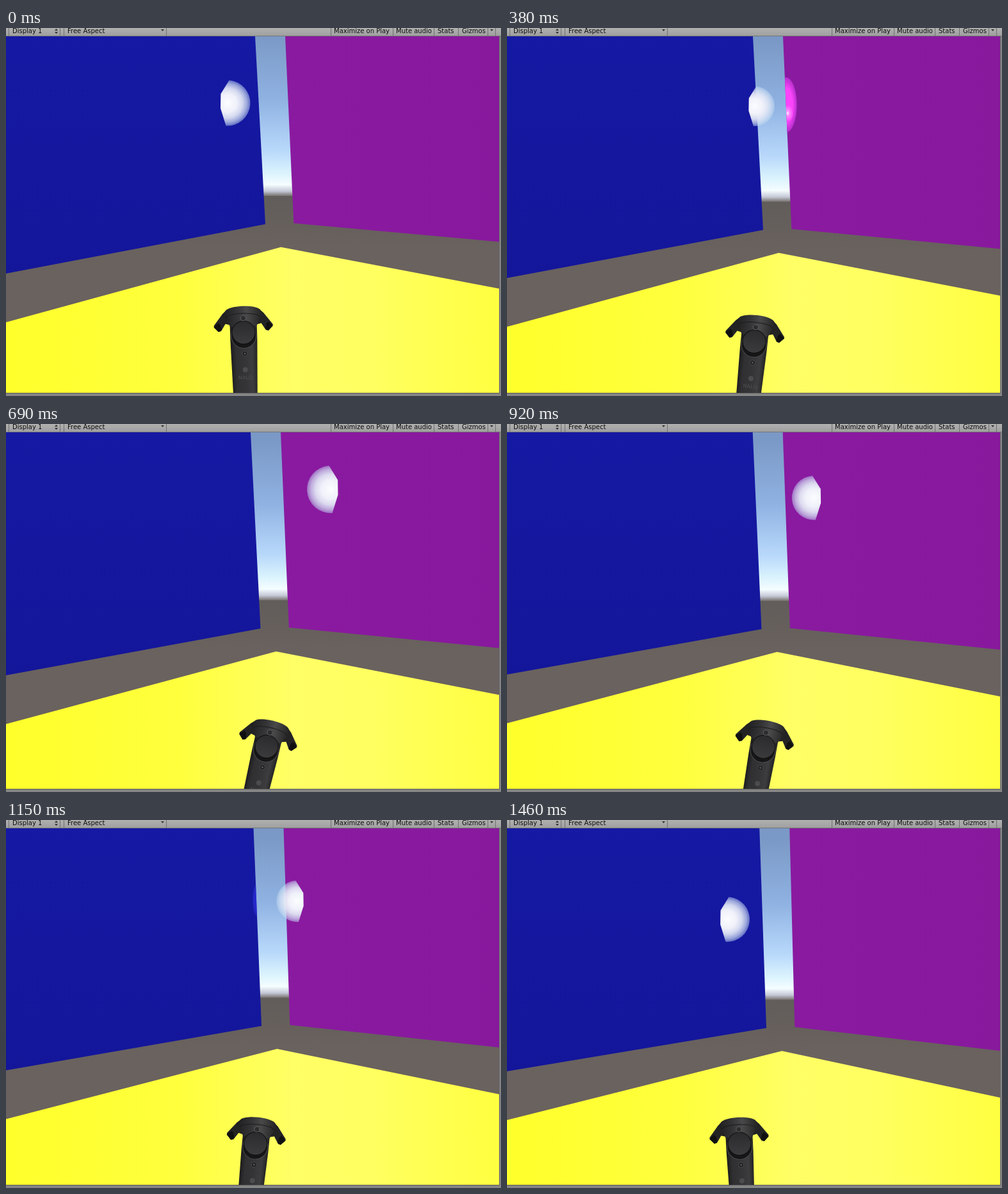
These frames come from a looping animation (773x574 px, 1540 ms). An HTML page with a canvas:

```html
<!DOCTYPE html>
<html lang="en">
<head>
<meta charset="utf-8">
<title>Corner room with controller</title>
<style>
  html, body { margin: 0; width: 100%; height: 100%; overflow: hidden; background: #858585; }
  canvas { display: block; }
</style>
</head>
<body>
<canvas id="stage" width="773" height="574"></canvas>
<script>
const ctx = document.getElementById('stage').getContext('2d');
const LOOP = 1540, STEP = 77, LAST = 19;

// step, corner x, corner y, wall top x, left y, right y, pad x, pad y, tilt
const poses = [
  [0, 405, 306, 389, 383, 333.5, 371, 475, -.03],
  [2, 403.5, 310.5, 387.5, 386, 339, 379, 479, .035],
  [5, 400, 315, 384, 390, 344.5, 386, 489, .105],
  [9, 397.5, 319, 382, 392, 349.5, 407, 503, .23],
  [14, 397.5, 320.5, 385, 390, 353.5, 396, 504, .14],
  [17, 402, 323, 390, 391.5, 357.5, 377, 506, .025],
  [19, 405, 324.5, 394.5, 392, 360, 363, 505, -.05]
];

// step, x, y, radius, wall (-1 blue, 1 purple), glow on the other wall
const balls = [
  [0, 346, 117, 35.5, -1, 0],
  [2, 379, 121, 33, -1, .4],
  [5, 387, 122, 31, -1, 1],
  [6, 444, 118, 33, 1, .9],
  [9, 507, 102, 37, 1, 0],
  [14, 461, 124, 33, 1, 0],
  [17, 442, 132, 31, 1, 1],
  [18, 378, 142, 33, -1, .3],
  [19, 344, 155, 35, -1, 0]
];

function sample(keys, step) {
  const next = Math.max(1, keys.findIndex(k => k[0] >= step));
  const a = keys[next - 1], b = keys[next];
  const u = (step - a[0]) / (b[0] - a[0]);
  return a.map((v, i) => v + (b[i] - v) * u).slice(1);
}

function fillStops(gradient, ...stops) {
  stops.forEach(([at, color]) => gradient.addColorStop(at, color));
  return gradient;
}

function linear(x0, y0, x1, y1, ...stops) {
  return fillStops(ctx.createLinearGradient(x0, y0, x1, y1), ...stops);
}

function radial(r, ...stops) {
  return fillStops(ctx.createRadialGradient(0, 0, 0, 0, 0, r), ...stops);
}

function trace(points) {
  ctx.beginPath();
  points.forEach(([x, y]) => ctx.lineTo(x, y));
  ctx.closePath();
}

function poly(fill, ...points) {
  trace(points);
  ctx.fillStyle = fill;
  ctx.fill();
}

function rect(fill, x, y, w, h) {
  ctx.fillStyle = fill;
  ctx.fillRect(x, y, w, h);
}

function disc(fill, x, y, r, stroke) {
  ctx.beginPath();
  ctx.arc(x, y, r, 0, 7);
  ctx.fillStyle = fill;
  ctx.fill();
  if (stroke) {
    ctx.strokeStyle = stroke;
    ctx.lineWidth = 1;
    ctx.stroke();
  }
}

function drawRoom([cx, cy, topX, leftY, rightY]) {
  const horizon = cy - 44;
  rect(linear(0, horizon, 0, horizon + 80, [0, '#615d5a'], [1, '#6a625e']), 0, 0, 773, 574);
  rect(linear(0, horizon - 250, 0, horizon,
    [0, '#7b99c6'], [.4, '#8fb2e2'], [.72, '#b9d9fb'], [.86, '#dcf4fd'],
    [.93, '#f5fdff'], [.97, '#c4c8d6'], [1, '#77726e']), 370, 0, 90, horizon);

  const blue = [[0, 0], [topX - .7, 0], [cx, cy], [0, leftY]];
  const purple = [[topX + 46.4, 0], [770, 0], [770, rightY], [cx + 44.3, cy - 1.5]];
  poly(linear(0, 0, 0, 390, [0, '#1519a3'], [1, '#14169a']), ...blue);
  poly(linear(430, 0, 770, 0, [0, '#8a1aa0'], [1, '#88199d']), ...purple);
  poly(linear(0, 0, 770, 0, [0, '#ffff2b'], [.35, '#ffff3d'], [.58, '#ffff66'],
    [.75, '#ffff60'], [1, '#ffff40']),
    [0, leftY + 76], [cx + 24.3, cy + 35.7], [770, rightY + 73], [770, 574], [0, 574]);
  return { blue, purple };
}

function drawGlow(walls, side, y, amount) {
  if (!amount) return;
  const onPurple = side < 0;
  const wall = onPurple ? walls.purple : walls.blue;
  const top = wall[onPurple ? 0 : 1], bottom = wall[onPurple ? 3 : 2];
  const edge = top[0] + (bottom[0] - top[0]) * y / bottom[1];
  const [rim, mid, core] = onPurple
    ? ['#b42ecb', '#fb45fa', '#ff8cff']
    : ['#2929c8', '#3636f5', '#8088f5'];
  ctx.save();
  trace(wall);
  ctx.clip();
  ctx.translate(edge, y);
  ctx.scale(17 * amount, 43 * Math.sqrt(amount));
  ctx.globalAlpha = .3 + .7 * amount;
  disc(radial(1, [0, mid], [.6, mid], [1, rim]), 0, 0, 1);
  if (amount > .8) {
    ctx.translate(.15, .3);
    ctx.scale(.5, .3);
    disc(radial(1, [0, '#fff'], [.3, core], [1, mid]), 0, 0, 1);
  }
  ctx.restore();
}

function drawBall([x, y, r, side]) {
  ctx.save();
  ctx.translate(x, y);
  ctx.scale(-side * r, r);
  ctx.beginPath();
  ctx.arc(0, 0, 1, -1.5, 1.64);
  ctx.lineTo(-.31, .23);
  ctx.lineTo(-.3, -.4);
  ctx.closePath();
  ctx.fillStyle = radial(1, [0, '#fbfdff'], [.4, '#f0f1fa'], [.65, 'rgba(226,231,245,.93)'],
    [.85, 'rgba(210,224,243,.72)'], [1, 'rgba(190,215,240,.45)']);
  ctx.fill();
  ctx.restore();
}

function drawController(x, y, tilt) {
  ctx.save();
  ctx.translate(x, y);
  ctx.rotate(tilt);

  // handle
  poly(linear(-21, 0, 21, 0, [0, '#1b1b1c'], [.2, '#303032'], [.55, '#353537'],
    [.8, '#3d3d3f'], [1, '#222']),
    [-21, -24], [21, -24], [21, 12], [18.5, 110], [-18.5, 110], [-21, 12]);

  // ring and wings
  for (const s of [-1, 1]) {
    poly('#232324', [s * 25, -36], [s * 32, -30], [s * 46, -12], [s * 46, -9], [s * 39, -2],
      [s * 35, -3], [s * 28, -14], [s * 20, -12], [s * 15, -28]);
    poly('#101011', [s * 36, -13], [s * 39, -16], [s * 46, -10], [s * 39, -2], [s * 34, -5]);
  }
  ctx.beginPath();
  ctx.moveTo(-33, -28);
  ctx.lineTo(-26, -36);
  ctx.bezierCurveTo(-17, -43, 17, -43, 26, -36);
  ctx.lineTo(33, -28);
  ctx.quadraticCurveTo(24, -21, 21, -10);
  ctx.lineTo(-21, -10);
  ctx.quadraticCurveTo(-24, -21, -33, -28);
  ctx.fillStyle = linear(-30, 0, 30, 0, [0, '#202021'], [.35, '#343436'], [.6, '#49494a'], [1, '#222']);
  ctx.fill();
  ctx.beginPath();
  ctx.ellipse(0, -23, 27, 7, 0, Math.PI, 0);
  ctx.strokeStyle = '#1b1b1c';
  ctx.stroke();

  // trackpad and buttons
  disc('#161617', 0, 5, 19.5, '#4b4b4d');
  disc(linear(0, -18, 0, 18, [0, '#2b2b2d'], [1, '#3b3b3d']), 0, 0, 18, '#0e0e0f');
  disc('#2c2c2d', 0, -22.5, 4, '#5e5e60');
  disc('#202021', 1, 33, 4, '#4a4a4c');
  disc('#555558', 1, 33, 1.5);

  disc('#4c4c4f', 1, 58, 4);
  ctx.fillStyle = '#515154';
  ctx.font = '8px "DejaVu Sans", sans-serif';
  ctx.textAlign = 'center';
  ctx.fillText('NALQ', 1, 73);
  ctx.restore();
}

function drawChrome() {
  rect('#858585', 770, 0, 3, 574);
  rect('#858585', 0, 569, 773, 5);
  rect('#5a5a5a', 0, 569, 771, 1);
  rect('#6c6c6c', 770, 13, 1, 557);
  rect(linear(0, 0, 0, 12, [0, '#b0b0b0'], [1, '#a0a0a0']), 0, 0, 773, 12);
  rect('#747474', 0, 12, 773, 1);
  for (const x of [4, 84, 90, 250, 507, 604, 668, 706, 752, 764]) rect('#707070', x, 0, 1, 12);
  ctx.fillStyle = '#0c0c0c';
  ctx.font = '10px "DejaVu Sans", Verdana, sans-serif';
  const labels = { 'Display 1': 10, 'Free Aspect': 96, 'Maximize on Play': 512,
    'Mute audio': 609, 'Stats': 674, 'Gizmos': 712 };
  for (const label in labels) ctx.fillText(label, labels[label], 8);
  const arrow = (x, y, h) => poly('#333', [x - 2.5, y], [x + 2.5, y], [x, y + h]);
  arrow(78.5, 4, -3);
  arrow(78.5, 6, 3);
  arrow(244.5, 2, 3);
  arrow(758.5, 2, 3);
}

function draw(now) {
  const step = Math.min(LAST, Math.floor((now % LOOP + 9) / STEP));
  const pose = sample(poses, step), ball = sample(balls, step);
  const walls = drawRoom(pose);
  drawGlow(walls, ball[3], ball[1] - 2, ball[4]);
  drawBall(ball);
  drawController(...pose.slice(5));
  drawChrome();
}

const start = performance.now();
function tick() {
  draw(performance.now() - start);
  requestAnimationFrame(tick);
}
tick();
</script>
</body>
</html>
```
